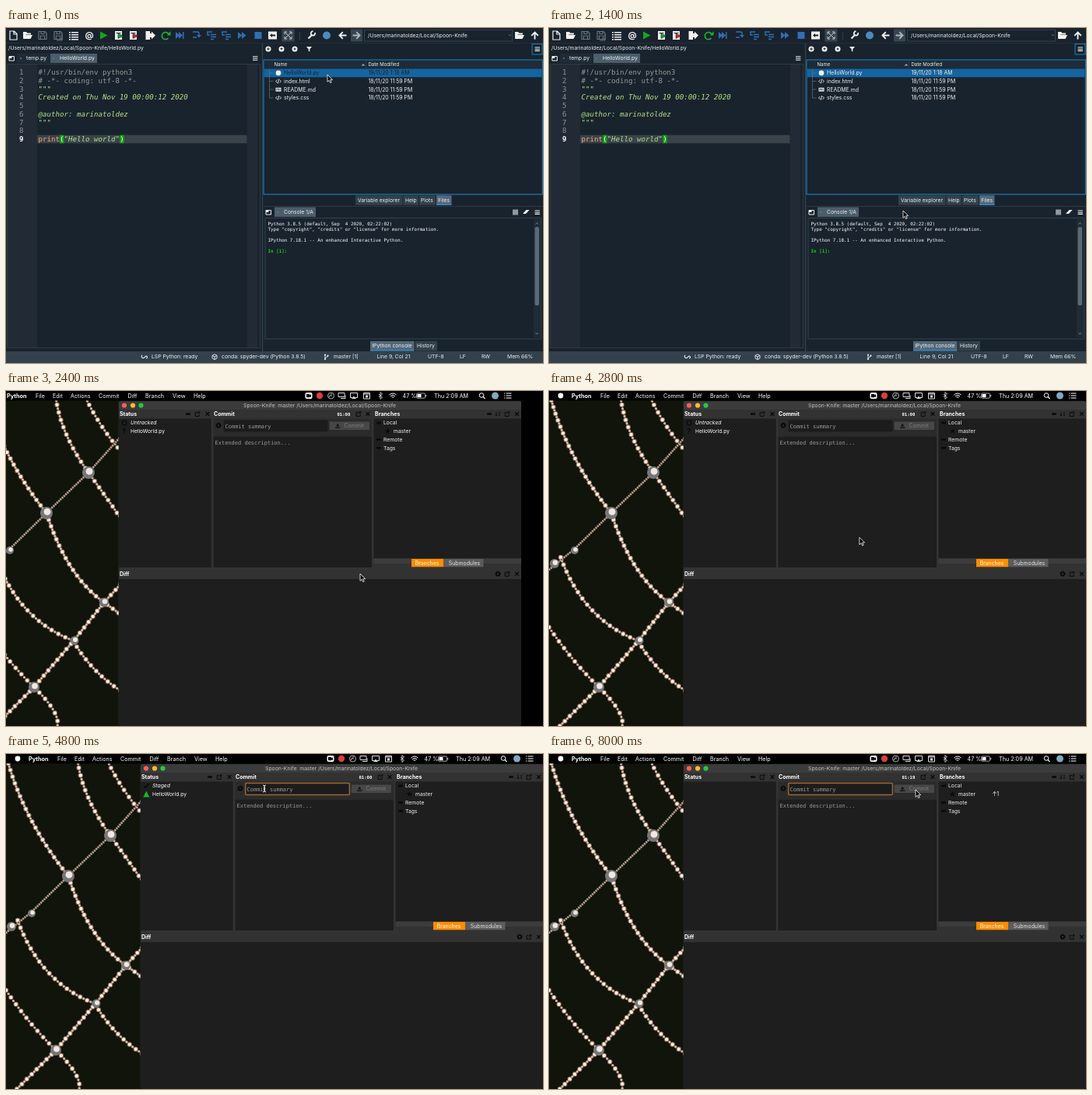
Animation of 690x431 px, one loop 8200 ms. Source, as an HTML page:

```html
<!DOCTYPE html>
<html lang="en">
<head>
<meta charset="utf-8">
<title>Committing a file from the editor</title>
<style>
html, body { margin: 0; width: 100%; height: 100%; overflow: hidden; background: #000; }
svg { display: block; width: 100vw; height: 100vh; }
text { white-space: pre; font-family: Inter, "DejaVu Sans", sans-serif; }
.mono { font-family: "DejaVu Sans Mono", monospace; }
.bold { font-weight: 700; }
.it { font-style: italic; }
</style>
</head>
<body>
<svg id="stage" viewBox="0 0 690 431"></svg>
<script>
const LOOP = 8200, STEP = 200;
const USER = "marinatoldez";
const REPO = `/Users/${USER}/Local/Spoon-Knife`;
const SUMMARY = "Add HelloWorld file";
const stage = document.getElementById("stage");

function add(parent, tag, attrs, content) {
  const node = document.createElementNS("http://www.w3.org/2000/svg", tag);
  for (const k in attrs) node.setAttribute(k, attrs[k]);
  if (content !== undefined) node.textContent = content;
  parent.appendChild(node);
  return node;
}
const group = (p) => add(p, "g", {});
// Box by its edges
const box = (p, x1, y1, x2, y2, fill, more) =>
  add(p, "rect", { x: x1, y: y1, width: x2 - x1, height: y2 - y1, fill, ...more });
const dot = (p, cx, cy, r, fill, more) => add(p, "circle", { cx, cy, r, fill, ...more });
const line = (p, d, stroke, width = 1, more) =>
  add(p, "path", { d, stroke, "stroke-width": width, fill: "none", ...more });
const shape = (p, d, fill, more) => add(p, "path", { d, fill, ...more });
// Text placed by the middle of its capitals
const label = (p, x, y, str, size = 6.8, fill = "#f0f0f0", cls = "", more) =>
  add(p, "text", { x, y: y + size * 0.36, "font-size": size, fill, class: cls, ...more }, str);
const show = (node, on) => node.setAttribute("visibility", on ? "inherit" : "hidden");

/* ---------- editor window ---------- */
const BG = "#19232d", EDGE = "#32414b", BLUE = "#1464a0", WHITE = "#f0f0f0", SKY = "#2f6fb5";
const ide = group(stage);
box(ide, 0, 0, 690, 431, BG);

const burger = (x, y) => line(ide, `M${x - 3} ${y - 2.2}h6.4m-6.4 2.2h6.4m-6.4 2.2h6.4`, WHITE, 1.1);
const folder = (x) => {
  shape(ide, `M${x - 6} 14V5h4l1.5 1.5h4.5v2h-6.5z`, WHITE);
  shape(ide, `M${x - 4} 9h10l-2.5 5h-9.5z`, WHITE);
};
const paneIcon = (x, y) => {
  line(ide, `M${x - 3} ${y - 2.5}h6.5v5.5h-6.5z`, WHITE, 1);
  shape(ide, `M${x - 3} ${y - 3}h3.5v3h-3.5z`, WHITE);
};
const page = (x, c) => {
  box(ide, x - 5, 4, x + 4, 15, WHITE);
  box(ide, x - 3.5, 6, x + 2.5, 7, BG);
  shape(ide, `M${x - 1} 7l6.5 3.2-6.5 3.3z`, c, { stroke: BG, "stroke-width": 0.6 });
};

function toolbar() {
  line(ide, "M5 4h5.5l3.5 3.5v7.5h-9zM10 4v4h4", WHITE, 1.2);
  folder(28);
  for (const x of [47, 67]) {
    line(ide, `M${x - 5} 4.5h8l2 2v8h-10zM${x - 2} 4.5v3h4v-3M${x - 2.5} 14v-4h5v4`, "#66727c", 1.2);
  }
  line(ide, "M72 8v8h-7", "#66727c", 1);
  for (let y = 5; y < 15; y += 3) {
    box(ide, 81, y, 83, y + 1.5, WHITE);
    box(ide, 84, y, 93, y + 1.5, WHITE);
  }
  label(ide, 101.5, 9.3, "@", 11, WHITE, "bold");
  shape(ide, "M121 4.5l9.5 5-9.5 5z", "#11a81f");
  page(145, "#11a81f");
  page(164, "#dd2222");
  box(ide, 179.5, 4, 185, 15, WHITE);
  shape(ide, "M185 7h2v-2.5l5 5-5 5v-2.5h-2z", WHITE);
  line(ide, "M209 8a4.6 4.6 0 1 0 -.5 5", "#20b030", 1.7);
  shape(ide, "M207 9.5h4.5v-5.5z", "#20b030");
  shape(ide, "M218 5l5 4.5-5 4.5zM222 5l5 4.5-5 4.5zM227 5h1.5v9h-1.5z", SKY);
  line(ide, "M240 5h6a2 2 0 0 1 2 2v3M240 12h5", SKY, 1.4);
  shape(ide, "M245 9h6l-3 3.5z", SKY);
  for (const x of [264, 283]) {
    line(ide, `M${x - 6} 5h7M${x - 1} 8.5h7m-7 3h7m-7 3h4M${x - 5} 5v4h3`, SKY, 1.4);
  }
  shape(ide, "M298 5l5.5 4.5-5.5 4.5zM303 5l5.5 4.5-5.5 4.5z", SKY);
  box(ide, 319.5, 5, 328.5, 14, SKY);
  box(ide, 337, 4.5, 348, 14.5, WHITE);
  shape(ide, "M339 9.5l3-2.5v1.5h4v2h-4v1.5z", BG);
  box(ide, 354.5, 1.5, 370.5, 17.5, "#37454f");
  line(ide, "M358 8v-3h3m3 0h3v3m0 3v3h-3m-3 0h-3v-3M358.5 5.5l8 8m0-8l-8 8", "#c8ced3", 1);
  line(ide, "M377.5 5v10", EDGE);
  line(ide, "M388.5 13.5l5-5", WHITE, 2.2);
  line(ide, "M397 6a2.7 2.7 0 1 1-2.5-1.8", WHITE, 1.8);
  dot(ide, 412, 9.5, 5, "#4b8bbe");
  line(ide, "M437.5 9.5h-9m4.3-4.3l-4.3 4.3 4.3 4.3", WHITE, 1.9);
  box(ide, 443, 1.5, 458, 17.5, "#37454f");
  line(ide, "M445.5 9.5h9m-4.3-4.3l4.3 4.3-4.3 4.3", "#aeb6bc", 1.9);
  box(ide, 460.5, 2.5, 650.5, 17, BG, { stroke: EDGE });
  label(ide, 465, 9.7, REPO, 6.8);
  line(ide, "M646 8.5l1.5 1.5 1.5-1.5", "#8a949c", 0.8);
  folder(660);
  line(ide, "M679.5 14.5v-9m-4.3 4.3l4.3-4.3 4.3 4.3", WHITE, 1.9);
}

function editor() {
  label(ide, 3, 26, REPO + "/HelloWorld.py", 6.75);
  paneIcon(7, 39);
  box(ide, 14, 33, 56, 45, "#1f2b36");
  box(ide, 57, 33, 117, 45, "#4b5d6b");
  for (const x of [19, 61]) line(ide, `M${x - 1} 38l2 2m0-2l-2 2`, "#6d7a84", 0.7);
  label(ide, 26, 39, "temp.py");
  label(ide, 69, 38.7, "HelloWorld.py");
  burger(320, 39);
  line(ide, "M1.5 46.5h325v365h-325z", EDGE, 0.8);
  box(ide, 2, 47, 40, 411, "#222b35");
  box(ide, 310, 47, 323, 411, "#222b35");
  box(ide, 40, 137.7, 309.5, 148.3, "#3a424a");
  const PITCH = 5.51, rowY = (n) => 56.8 + (n - 1) * 10.75;
  for (let n = 1; n <= 9; n++) {
    const [c, cls] = n === 9 ? ["#fff", "mono bold"] : ["#8b959e", "mono"];
    label(ide, 22.5, rowY(n), n, 9.15, c, cls, { "text-anchor": "end" });
  }
  const code = (n, col, str, c, it = "") => label(ide, 41.5 + col * PITCH, rowY(n), str, 9.15, c, "mono " + it);
  const GREY = "#999", GREEN = "#b0e686";
  code(1, 0, "#!/usr/bin/env python3", GREY);
  code(2, 0, "# -*- coding: utf-8 -*-", GREY);
  code(3, 0, '"""', GREEN, "it");
  code(4, 0, "Created on Thu Nov 19 00:00:12 2020", GREEN, "it");
  code(6, 0, "@author: " + USER, GREEN, "it");
  code(7, 0, '"""', GREEN, "it");
  for (const col of [5, 19]) box(ide, 41.5 + col * PITCH, 137.7, 47 + col * PITCH, 148.3, "#12a012");
  code(9, 0, "print", "#fab16c");
  code(9, 5, "(", "#fff");
  code(9, 6, '"Hello world"', GREEN, "it");
  code(9, 19, ")", "#fff");
}

const tab = (x1, x2, y, tx, str, on) => {
  box(ide, x1, y - 6, x2, y + 6.5, on ? "#54687a" : EDGE);
  if (on) box(ide, x1, y + 5.5, x2, y + 6.5, "#259ae9");
  label(ide, tx, y, str, 6.75);
};

const hoverName = group(stage);
function filesPane() {
  for (const [x, d] of [[337, "M-1.8 0h3.6M0-1.8v3.6"], [354, "M-1.5-.5h3M0 1.5v-3"], [371, "M-1.5 0h3M0-1.5v3"]]) {
    dot(ide, x, 27, 3.5, WHITE);
    line(ide, d, BG, 1, { transform: `translate(${x} 27)` });
  }
  shape(ide, "M386 24h7l-2.7 3.2v3.3l-1.6-1v-2.3z", WHITE);
  box(ide, 676, 20.5, 689, 34, BG, { stroke: "#148cd2", "stroke-width": 0.9 });
  burger(682.5, 27.2);
  box(ide, 331, 41, 689.3, 214, BG, { stroke: "#148cd2" });
  box(ide, 333, 42, 687.5, 52, "#1f2b36");
  line(ide, "M462.5 42v10", EDGE, 0.8);
  label(ide, 344.5, 47, "Name", 6);
  label(ide, 465.5, 47, "Date Modified", 6);
  shape(ide, "M456.5 48.5l2.5-2.5 2.5 2.5z", "#9aa5ad");
  box(ide, 332, 52.5, 688.5, 63.3, BLUE);
  line(ide, "M338.5 53v37M338.5 58h5m-5 10.5h5m-5 10.5h5m-5 11h5", "#66727c", 0.7);
  ide.appendChild(hoverName);
  label(hoverName, 357, 57.7, "HelloWorld.py", 6.9, "inherit");
  label(hoverName, 465.5, 57.7, "19/11/20 1:18 AM", 6.9, "inherit");
  dot(ide, 350, 57.9, 3.3, WHITE);
  ["index.html", "README.md", "styles.css"].forEach((name, i) => {
    const y = 68.5 + i * 10.7;
    label(ide, 357, y, name, 6.9);
    label(ide, 465.5, y, "18/11/20 11:59 PM", 6.9);
    if (i === 1) {
      box(ide, 346.5, y - 2.4, 353.5, y + 2.4, WHITE);
      line(ide, `M348 ${y + 1.3}v-2.6l1.2 1.3 1.2-1.3v2.6M352 ${y - 1.3}v2.3`, BG, 0.7);
    } else {
      line(ide, `M348.5 ${y - 2}l-2 2 2 2m3-4l2 2-2 2M350.6 ${y - 2.8}l-1.3 5.6`, WHITE, 0.9);
    }
  });
  tab(449, 509.5, 221.3, 452, "Variable explorer");
  tab(510.5, 530, 221.3, 513, "Help");
  tab(531, 552, 221.3, 533, "Plots");
  tab(553, 572.5, 221.3, 555.3, "Files", true);
}

function consolePane() {
  line(ide, "M331 229.5h359", EDGE, 0.8);
  paneIcon(337, 237);
  box(ide, 345, 230.5, 398, 243, "#4b5d6b");
  line(ide, "M348.5 236l2 2m0-2l-2 2", "#6d7a84", 0.7);
  label(ide, 357, 236.7, "Console 1/A");
  box(ide, 651, 233.5, 658, 240.5, "#8f989f");
  shape(ide, "M664 239l4.5-5h4l-4.5 5z", WHITE);
  burger(682.5, 237.2);
  box(ide, 333, 244.5, 687.5, 400, BG, { stroke: EDGE });
  const out = (row, str, c = "#fff", cls = "mono") => label(ide, 336.5, 252.2 + row * 7, str, 5.9, c, cls);
  out(0, "Python 3.8.5 (default, Sep  4 2020, 02:22:02)");
  out(1, 'Type "copyright", "credits" or "license" for more information.');
  out(3, "IPython 7.18.1 -- An enhanced Interactive Python.");
  out(5, "In [1]:", "#21c821", "mono bold");
  box(ide, 678, 246, 686.5, 398, "#1f2b36");
  box(ide, 679.5, 256, 685, 357, "#5a6a76", { rx: 2 });
  line(ide, "M680.5 252.5l1.8-2 1.8 2M680.5 392l1.8 2 1.8-2", "#8a949c", 0.8);
  tab(468, 524.5, 408.9, 470.3, "IPython console", true);
  tab(525.5, 554, 408.9, 528, "History");
}

function statusBar() {
  box(ide, 0, 416, 690, 431, EDGE);
  const y = 423;
  line(ide, `M175 ${y - 2}a2 2 0 1 0 3 2.5l2-1.5a1.5 1.5 0 1 1 0 3`, WHITE, 1.1);
  line(ide, `M268 ${y - 3.3}l3 1.7v3.5l-3 1.7-3-1.7v-3.5zM265 ${y - 1.6}l3 1.6 3-1.6M268 ${y}v3.5`, WHITE, 0.9);
  line(ide, `M410 ${y - 2}v5M413.5 ${y - 1}c0 2-3.5 1-3.5 3`, WHITE, 0.9);
  for (const [x, dy] of [[410, -2.5], [410, 3], [413.5, -1.5]]) dot(ide, x, y + dy, 1.1, WHITE);
  [[187, "LSP Python: ready"], [277, "conda: spyder-dev (Python 3.8.5)"], [421, "master [1]"],
   [476.5, "Line 9, Col 21"], [542, "UTF-8"], [583, "LF"], [611, "RW"], [644, "Mem 66%"]]
    .forEach(([x, s]) => label(ide, x, y, s, 6.8));
}

toolbar();
editor();
line(ide, "M329.5 20v396", EDGE, 1.4);
line(ide, "M0 19.5h690", "#27333d", 0.8);
filesPane();
consolePane();
statusBar();

/* ---------- context menu ---------- */
const menu = group(ide);
box(menu, 413.7, 62, 541, 252, "#2d3943", { stroke: "#3f4d57", "stroke-width": 0.6 });
const menuBar = box(menu, 414, 0, 541, 13.5, BLUE);
const items = [["New", 69, ">"], ["Run", 82.7], ["Open in Spyder", 96.2], ["Open with", 109.6, ">"],
  ["Delete...", 123.2], ["Rename...", 136.6], ["Move...", 150], ["Copy", 163.9, "⌘C"],
  ["Paste", 177.4, "⌘V"], ["Copy Absolute Path", 191, "⌥⌘C"], ["Copy Relative Path", 204.4, "⌥⇧⌘C"],
  ["Show in Viewer", 218.2], ["Commit", 232], ["Browse repository", 245.7]];
for (const [name, y, key] of items) {
  const c = name === "Paste" ? "#717c85" : WHITE;
  label(menu, 426.5, y, name, 7.2, c);
  if (key === ">") line(menu, `M534 ${y - 2}l2 2-2 2`, "#8a949c", 0.8);
  else if (key) label(menu, 501.5, y, key, 7, c);
}
line(menu, "M414 156.7h127M414 211.2h127", "#505d67", 0.8);

/* ---------- desktop with the commit tool ---------- */
const desk = group(stage);
const DARK = "#1e1e1e", BAR = "#323232", MUTED = "#9a9a9a", ORANGE = "#ff8c00";
box(desk, 0, 0, 690, 431, "#10140a");

function wallpaper() {
  const beads = (d, c, w, gap, shift = 0) =>
    line(desk, d, c, w, { "stroke-linecap": "round", "stroke-dasharray": `0 ${gap}`, "stroke-dashoffset": shift });
  const strands = ["M3 12Q25 88 80 157", "M92 8Q98 55 134 105T176 165", "M130 8Q148 46 176 78",
    "M80 157Q106 238 154 272T178 296", "M15 214Q44 294 114 321 138 362 176 386", "M0 304Q30 348 64 381T94 431",
    "M14 431L64 381 116 320 154 272 176 248"];
  strands.forEach((d, i) => {
    const gap = 9 + i % 3;
    line(desk, d, "#4b4238", 0.7);
    beads(d, "#94654d", 6.4, gap);
    beads(d, "#c9b5a4", 3.4, gap, gap / 2);
    beads(d, "#f8f0e8", 4.4, gap);
  });
  const thread = "M0 230L33 203 80 157 134 105 176 58";
  line(desk, thread, "#6f5a4c", 2.2);
  line(desk, thread, "#c9b3a0", 3, { "stroke-dasharray": "1.2 1.9" });
  for (const [x, y, r] of [[134, 105, 8], [80, 157, 8], [33, 205, 5], [7, 222, 6], [154, 272, 6], [116, 321, 5.5], [64, 381, 7]]) {
    dot(desk, x, y, r, "#77777a");
    dot(desk, x + 1, y - r * 0.2, r * 0.55, "#f0e8e0");
  }
}

function menuStrip() {
  box(desk, 0, 0, 690, 12.3, "#000");
  dot(desk, 15, 6, 3.4, "#fff");
  label(desk, 29, 6, "Python", 7.3, "#fff", "bold");
  [[66, "File"], [88, "Edit"], [111, "Actions"], [147, "Commit"], [184.5, "Diff"], [207, "Branch"],
   [242, "View"], [269, "Help"], [537.5, "47 %"], [578, "Thu 2:09 AM"]]
    .forEach(([x, s]) => label(desk, x, 6, s, 7.2, "#fff"));
  box(desk, 412.5, 2, 421.5, 10, "#fff", { rx: 2 });
  shape(desk, "M414 4h4v1.3l2-1v4l-2-1v1h-4z", "#000");
  dot(desk, 431, 6, 4.2, "#d8403c");
  dot(desk, 445.5, 6, 4, "none", { stroke: "#ddd", "stroke-width": 0.8 });
  line(desk, "M444 8a1.3 1.3 0 1 1 2-1.5v-3.5", "#ddd", 0.8);
  line(desk, "M455 2.5h8v5h-8zM458 9.5h6v-4", "#ddd", 1);
  line(desk, "M473 8.5h-2.5v-6h9v6h-2.5", "#ddd", 1);
  shape(desk, "M472 10l3-3.5 3 3.5z", "#ddd");
  line(desk, "M487.5 2.5h8v7.5h-8zM487.5 4h8", "#ddd", 1);
  shape(desk, "M490 5.5h3v3h-3z", "#ddd");
  line(desk, "M507 4l4.5 4-2.5 2.5v-9l2.5 2.5-4.5 4", "#ddd", 0.9);
  line(desk, "M520.5 5q4.5-4 9 0M522 6.7q3-2.6 6 0M523.6 8.4q1.4-1.2 2.8 0", "#fff", 1);
  box(desk, 555.5, 3, 566.5, 9.2, "none", { stroke: "#ccc", "stroke-width": 0.8, rx: 1.2 });
  box(desk, 556.5, 4, 561.5, 8.2, "#fff");
  box(desk, 567.3, 5, 568.3, 7.3, "#ccc");
  dot(desk, 639, 5.5, 2.8, "none", { stroke: "#fff" });
  line(desk, "M641 7.5l2.5 2.5", "#fff", 1.1);
  dot(desk, 656.5, 6, 4.5, "#7fa9c4");
  line(desk, "M668 3h1.2m1.3 0h7M668 6h1.2m1.3 0h7M668 9h1.2m1.3 0h7", "#fff", 1.1);
}

const INK = "#0a0a0a";
const gear = (x, y) => {
  dot(desk, x, y, 2.1, "none", { stroke: INK, "stroke-width": 1.8 });
  dot(desk, x, y, 3.3, "none", { stroke: INK, "stroke-width": 1, "stroke-dasharray": "1.3 1.3" });
};
const dash = (x, y) => box(desk, x - 3, y - 1.2, x + 3, y + 1.2, INK, { rx: 0.5 });
const floatIcon = (x, y) => line(desk, `M${x} ${y - 2}h-2.8v5h5v-2.5M${x - 0.5} ${y + 0.5}l3.2-3.2m-2.2 0h2.3v2.3`, INK, 1);
const closeIcon = (x, y) => line(desk, `M${x - 2.3} ${y - 2.3}l4.6 4.6m0-4.6l-4.6 4.6`, INK, 1.3);

function toolWindow() {
  box(desk, 172.7, 13, 690, 430.5, "#333", { rx: 3 });
  box(desk, 173, 13.3, 690, 24, "#3b3b3b", { rx: 2 });
  [["#ff5f57", 180], ["#febc2e", 191], ["#28c840", 201.5]].forEach(([c, x]) => dot(desk, x, 18.5, 3.1, c));
  label(desk, 431, 18.5, `Spoon-Knife: master ${REPO}`, 6.8, "#c4c4c4", "", { "text-anchor": "middle" });
  box(desk, 173, 24, 690, 35.5, BAR);
  box(desk, 173, 230, 690, 241.5, BAR);
  [[174, 29.7, "Status"], [295, 29.7, "Commit"], [502, 29.7, "Branches"], [174, 235.5, "Diff"]]
    .forEach(([x, y, s]) => label(desk, x, y, s, 7, "#fff", "bold"));
  dash(262, 29.5);
  dash(649, 29.5);
  line(desk, "M658 27v5m-1.5-1.5l1.5 1.5 1.5-1.5M661 27.5h2m-2 2h2m-2 2h2", INK, 0.9);
  for (const [x, y] of [[274, 29.5], [481, 29.5], [672, 29.5], [672, 235.2]]) floatIcon(x, y);
  for (const [x, y] of [[287, 29.5], [493, 29.5], [684.5, 29.5], [684.5, 235.2]]) closeIcon(x, y);
  gear(660, 235.2);
  box(desk, 173, 35.5, 291.8, 227, DARK);
  box(desk, 294.5, 35.5, 498, 58, "#2b2b2b");
  box(desk, 294.5, 58.5, 498, 227, DARK);
  box(desk, 500.5, 35.5, 690, 215.5, DARK);
  box(desk, 173, 242, 690, 430, DARK, { rx: 1 });
  gear(301, 44.3);
  label(desk, 296.5, 66, "Extended description...", 7, MUTED, "mono");
  for (const [y, s] of [[41, "Local"], [62.5, "Remote"], [73.3, "Tags"]]) {
    dash(507, y);
    label(desk, 513, y, s, 6.8);
  }
  shape(desk, "M518.5 48l1 2.5h2.7l-2.2 1.7.8 2.7-2.3-1.6-2.3 1.6.8-2.7-2.2-1.7h2.7z", INK);
  label(desk, 526, 51.7, "master", 6.8);
  box(desk, 500.5, 215.5, 690, 222, "#3c3c3c");
  box(desk, 500.5, 222, 690, 230, BAR);
  box(desk, 549, 216, 590, 226.3, ORANGE);
  box(desk, 590, 216, 641.5, 226.3, "#5c5c5c");
  label(desk, 569, 221.5, "Branches", 6.9, "#fff", "", { "text-anchor": "middle" });
  label(desk, 617, 221.5, "Submodules", 6.9, "#e4e4e4", "", { "text-anchor": "middle" });
}

wallpaper();
menuStrip();
toolWindow();

const picked = box(desk, 173, 46.3, 291.8, 57, "#c85f00");
const untracked = group(desk), staged = group(desk), diff = group(desk);
const statusRow = (g, name) => {
  label(g, 188, 41, name, 6.8, "#fff", "it");
  label(g, 188, 51.7, "HelloWorld.py", 6.7, "#fff");
};
statusRow(untracked, "Untracked");
dot(untracked, 180, 41, 2.8, "none", { stroke: INK, "stroke-width": 1.2 });
label(untracked, 177, 51.7, "?", 9.5, INK, "bold");
statusRow(staged, "Staged");
line(staged, "M177 41l2.3 2.3 4-4.8", INK, 1.6);
shape(staged, "M180.3 47.5l4 8h-8z", "#16b81c");
["#!/usr/bin/env python3", "# -*- coding: utf-8 -*-", '"""', "Created on Thu Nov 19 00:00:12 2020", "",
 "@author: " + USER, '"""', "", 'print("Hello world")']
  .forEach((s, i) => label(diff, 175.3, 249.2 + i * 9.7, s, 7, "#f2f2f2", "mono"));

const field = box(desk, 307.7, 37.4, 441.4, 52.4, "#1c1c1c", { rx: 1, "stroke-width": 1.5 });
const summary = label(desk, 309.5, 45, "", 7, MUTED, "mono");
const column = label(desk, 453.5, 29.5, "", 5.6, "#fff", "mono bold");
const button = box(desk, 443.8, 39.5, 495, 50, "#474747", { rx: 1 });
shape(desk, "M451 48v-1.5h6.5v1.5zM454.2 41.5l2.3 4h-4.6z", "#151515");
const buttonText = label(desk, 462.5, 44.9, "Commit", 6.9, "#7d7d7d");
const ahead = label(desk, 569.5, 51.7, "↑1", 7, "#fff");

/* ---------- pointer ---------- */
const arrow = shape(stage, "M0 0v9.3l2.2-2 1.5 3.3 1.5-.7-1.5-3.2h3z", "#000",
  { stroke: "#fff", "stroke-width": 0.8, "stroke-linejoin": "round" });
const beam = group(stage);
for (const [c, w] of [["#000", 2], ["#fff", 1]]) {
  line(beam, "M-2-4.5q2 0 2 1.5v6q0 1.5-2 1.5M2-4.5q-2 0-2 1.5v6q0 1.5 2 1.5M-1 1h2", c, w);
}

// time, x, y of the pointer tip
const PATH = [[0, 413, 60], [400, 413, 60], [1000, 455, 235], [2600, 455, 235], [3200, 238.5, 55],
  [4200, 238.5, 55], [4600, 332, 44.5], [6400, 332, 44.5], [7000, 471, 46], [LOOP, 471, 46]];

function pointerAt(t) {
  const i = PATH.findIndex((p) => p[0] > t);
  const [t0, x0, y0] = PATH[i - 1], [t1, x1, y1] = PATH[i];
  const k = (t - t0) / (t1 - t0), e = k * k * (3 - 2 * k);
  return [x0 + (x1 - x0) * e, y0 + (y1 - y0) * e];
}

function render(time) {
  const t = Math.floor(time / STEP) * STEP;
  const [x, y] = pointerAt(t);

  const onDesk = t >= 2400;
  show(ide, !onDesk);
  show(desk, onDesk);
  desk.setAttribute("transform", `translate(${t === 2400 ? -28 : 0} 0)`);

  const menuOpen = t >= 400 && t < 1400;
  show(menu, menuOpen);
  hoverName.setAttribute("fill", t < 400 ? BG : WHITE);
  const hot = items.find((it) => Math.abs(it[1] - y) < 6.8);
  show(menuBar, menuOpen && !!hot);
  if (hot) menuBar.setAttribute("y", hot[1] - 6.8);

  const done = t >= 7400;
  const chars = Math.round(SUMMARY.length * Math.min(1, Math.max(0, (t - 4800) / 1600)));
  const typed = done ? 0 : chars;
  show(picked, t >= 3400 && t < 4200);
  show(diff, t >= 3400 && t < 4200);
  show(untracked, t < 4200);
  show(staged, t >= 4200 && !done);
  show(ahead, done);
  field.setAttribute("stroke", t >= 4800 ? "#9c6530" : "none");
  summary.textContent = typed ? SUMMARY.slice(0, typed) : "Commit summary";
  summary.setAttribute("fill", typed ? "#f2f2f2" : MUTED);
  column.textContent = "01:" + String(chars).padStart(2, "0");
  button.setAttribute("fill", typed ? "#5c5c5c" : "#474747");
  buttonText.setAttribute("fill", typed ? "#fff" : "#7d7d7d");

  const inField = t >= 4600 && t < 6600;
  show(arrow, !inField);
  show(beam, inField && t < 5000);
  for (const p of [arrow, beam]) p.setAttribute("transform", `translate(${x} ${y})`);
}

const start = performance.now();
function tick() {
  render((performance.now() - start) % LOOP);
  requestAnimationFrame(tick);
}
tick();
</script>
</body>
</html>
```
